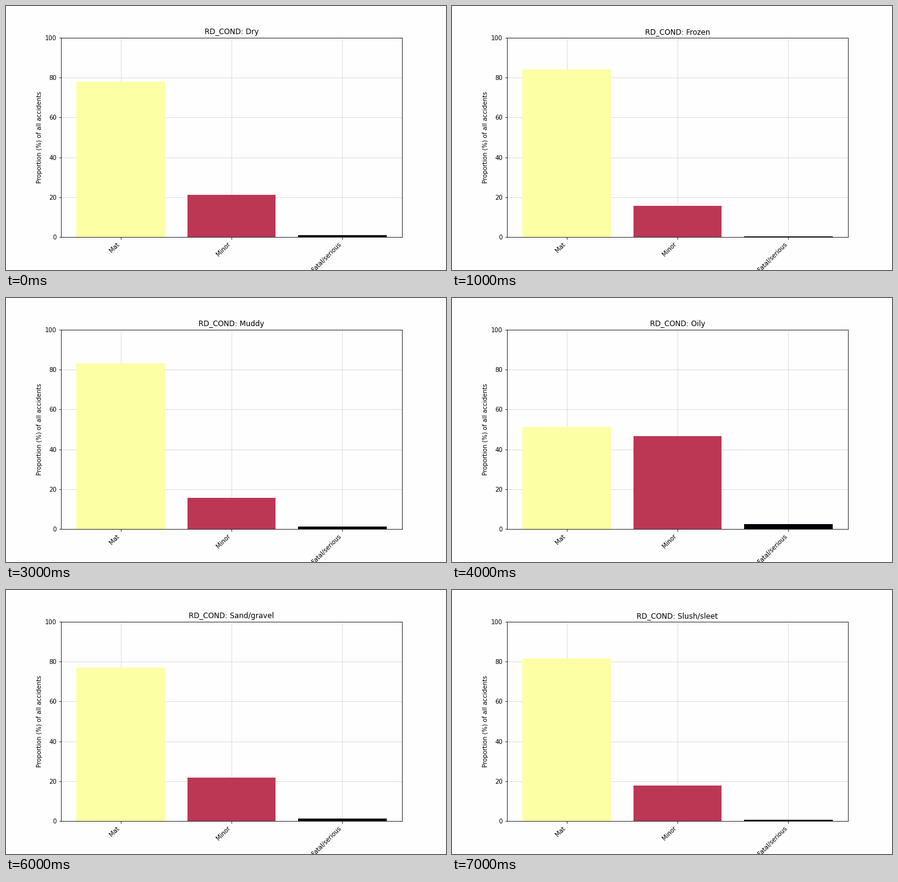
Animation of 720 by 432 pixels, one loop 8 s. Source, as a matplotlib script:

```python
import matplotlib.pyplot as plt
from matplotlib.animation import FuncAnimation

BACK = "#fefefe"
LABELS = ["Mat", "Minor", "Fatal/serious"]
COLORS = ["#fcffa4", "#bc3754", "#000004"]

# Road condition and its share of accidents by severity
CONDITIONS = [
    ("Dry", (77.9, 21.2, 0.9)),
    ("Frozen", (83.9, 15.7, 0.4)),
    ("Hard snow", (86.7, 12.9, 0.4)),
    ("Muddy", (83.1, 15.7, 1.2)),
    ("Oily", (51.2, 46.5, 2.4)),
    ("Other", (92.6, 7.05, 0.35)),
    ("Sand/gravel", (77.0, 21.9, 1.1)),
    ("Slush/sleet", (81.6, 17.8, 0.65)),
]

fig = plt.figure(figsize=(10, 6), dpi=72, facecolor=BACK)
ax = fig.add_axes([0.125, 0.125, 0.775, 0.755], facecolor=BACK)
bars = ax.bar(range(3), CONDITIONS[0][1], color=COLORS)
ax.set_ylim(0, 100)
ax.set_ylabel("Proportion (%) of all accidents")
ax.set_xticks(range(3), LABELS, rotation=45, ha="right")
ax.set_axisbelow(True)
ax.grid(alpha=0.5)


def update(i):
    name, shares = CONDITIONS[i]
    ax.set_title(f"RD_COND: {name}")
    for bar, share in zip(bars, shares):
        bar.set_height(share)
    return list(bars)


anim = FuncAnimation(fig, update, frames=len(CONDITIONS), interval=1000,
                     repeat=True, repeat_delay=0, blit=False)
plt.show()
```
